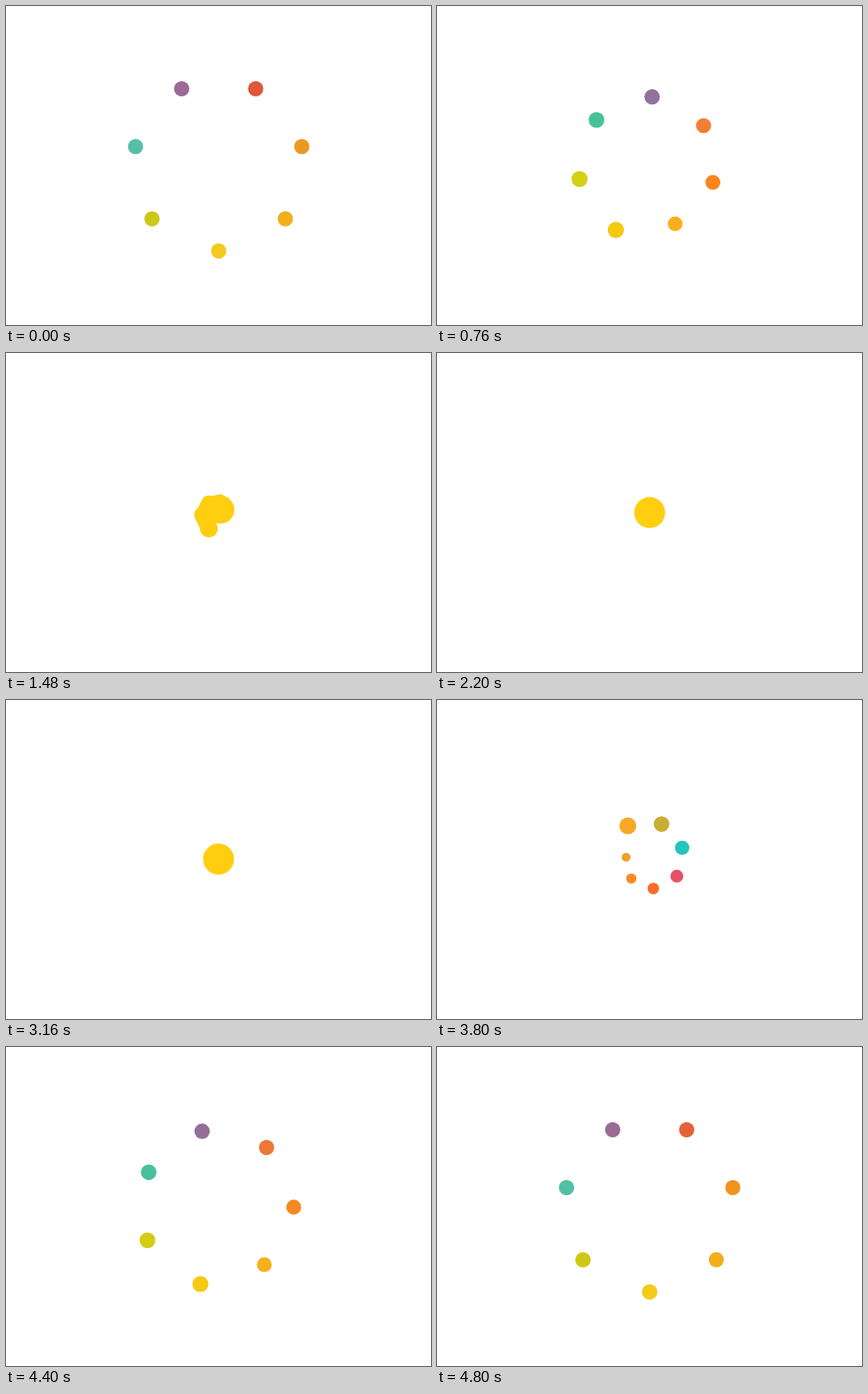
Recreate the animation shown at these times as an HTML page with a canvas. Size 480x360 px, loop 5000 ms.

```html
<!DOCTYPE html>
<html lang="en">
<head>
<meta charset="utf-8">
<title>Merging dots</title>
<style>
  html, body { margin: 0; width: 100%; height: 100%; overflow: hidden; background: #fff; }
  canvas { display: block; }
</style>
</head>
<body>
<canvas width="480" height="360"></canvas>
<script>
const ctx = document.querySelector('canvas').getContext('2d');
const LOOP = 5000, STEP = 40, RADIUS = 96.3, MERGED = 0xffce10;

// Dot colours at each key time, from the last dot to merge to the first.
const KEYS = [0, 760, 880, 1200, 1420];
const COLORS = [
  [0xf4ca1c, 0xf6c912, 0xe9c833, 0xf9a825, MERGED],
  [0xcdc718, 0xd4d012, 0xdccf35, 0xc9ae36, MERGED],
  [0x55bfa8, 0x45c299, 0x22d0ae, 0x25c4be, MERGED],
  [0x9c6a92, 0x92729a, 0xb26282, 0xe85164, MERGED],
  [0xe0573a, 0xf07f35, 0xf27030, 0xfa6c2a, MERGED],
  [0xeb991f, 0xf98620, 0xf07030, 0xf98a25, MERGED],
  [0xf2ae1c, 0xfbaf1e, 0xefc03a, 0xf0a028, MERGED]
];
const LAST_SIZE = [8.6, 9.2, 9.4, 9.6, 10.2];
const FIRST_SIZE = [8.6, 8.3, 7.8, 5, 3];

const clamp = x => Math.min(1, Math.max(0, x));
const lerp = (a, b, k) => a + (b - a) * k;
const easeInOut = x => x < .5 ? 2 * x * x : 1 - 2 * (1 - x) ** 2;

function mixColor(a, b, k) {
  const part = shift => Math.round(lerp(a >> shift & 255, b >> shift & 255, k));
  return `rgb(${part(16)},${part(8)},${part(0)})`;
}

function keyed(values, t, mix = lerp) {
  let i = 0;
  while (i < KEYS.length - 2 && t >= KEYS[i + 1]) i++;
  return mix(values[i], values[i + 1], clamp((t - KEYS[i]) / (KEYS[i + 1] - KEYS[i])));
}

function rotation(t) {
  return t < 1480 ? Math.max(0, 2.6 * Math.exp(.0034 * t) - 6.7) : 391.7 + .88 * (t - 1480);
}

function circle(x, y, r, color) {
  ctx.fillStyle = color;
  ctx.beginPath();
  ctx.arc(x, y, r, 0, 2 * Math.PI);
  ctx.fill();
}

function dotAt(i, t) {
  const lead = i / 6;
  const progress = easeInOut(clamp((t - lerp(266, 180, lead)) / lerp(1815, 1625, lead)));
  const angle = (90 + i * 360 / 7 + rotation(t)) * Math.PI / 180;
  const distance = RADIUS * (1 - progress);
  return {
    x: distance * Math.cos(angle),
    y: distance * Math.sin(angle),
    size: lerp(keyed(LAST_SIZE, t), keyed(FIRST_SIZE, t), lead),
    color: keyed(COLORS[i], t, mixColor)
  };
}

function draw(time) {
  const t = Math.min(time, LOOP - time);
  const dots = COLORS.map((_, i) => dotAt(i, t));
  ctx.setTransform(1, 0, 0, 1, 0, 0);
  ctx.clearRect(0, 0, 480, 360);
  ctx.translate(240.2, 180.1);
  dots.forEach(d => circle(d.x, d.y, d.size, d.color));

  // Neighbours fuse once they touch, then the core swallows them.
  ctx.lineCap = 'round';
  dots.slice(1).forEach((b, i) => {
    const a = dots[i];
    if (Math.hypot(a.x - b.x, a.y - b.y) > 21) return;
    ctx.strokeStyle = b.color;
    ctx.lineWidth = 2 * Math.min(a.size, b.size);
    ctx.beginPath();
    ctx.moveTo(a.x, a.y);
    ctx.lineTo(b.x, b.y);
    ctx.stroke();
  });
  const core = 17.5 * clamp((t - 1300) / 200);
  if (core) circle(-.18 * dots[0].x, -.18 * dots[0].y, core, mixColor(MERGED, MERGED, 0));
}

const start = performance.now();
function frame() {
  const elapsed = (performance.now() - start) % LOOP;
  draw(Math.min(4800, Math.floor(elapsed / STEP) * STEP));
  requestAnimationFrame(frame);
}
frame();
</script>
</body>
</html>
```
